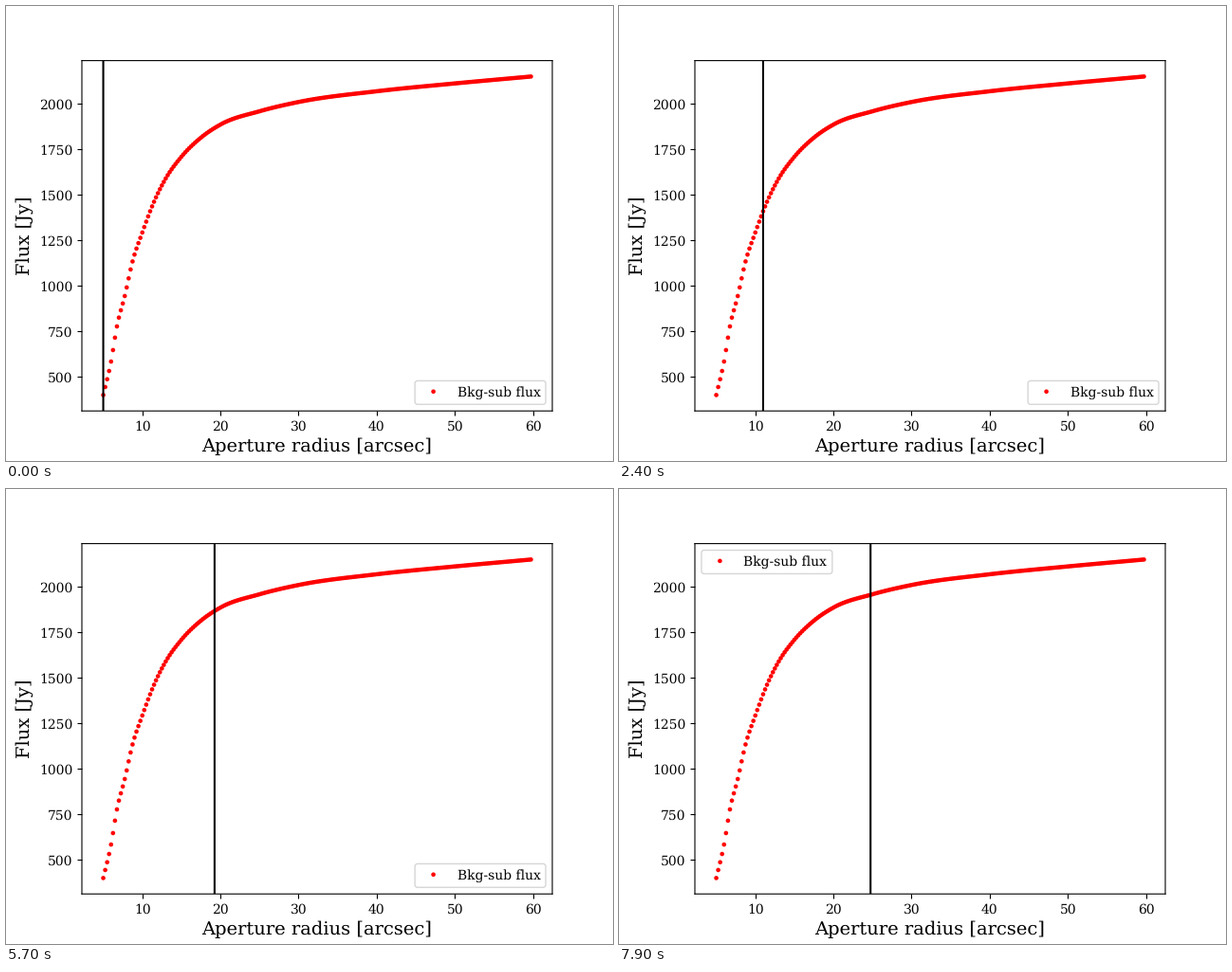
A matplotlib script that plays this animation: 640x480 px, repeating every 8000 ms.

```python
import numpy as np
import matplotlib.pyplot as plt
from matplotlib.animation import FuncAnimation

FRAMES = 80
INTERVAL = 100  # ms
STEP = 0.25     # arcsec between apertures

plt.rcParams.update({
    "font.family": "DejaVu Serif",
    "text.hinting": "none",
    "path.snap": False,
    "legend.scatteryoffsets" if False else "legend.scatterpoints": 1,
})

# Key points of the curve of growth: radius, flux
CURVE = np.array([(5, 400), (6, 584), (6.75, 777), (7.75, 944), (8.75, 1134),
                  (10, 1293), (11.5, 1462), (13, 1590), (15, 1709),
                  (17.5, 1814), (20, 1886), (25, 1959), (30, 2010),
                  (40, 2069), (50, 2112), (59.75, 2150)])


def smooth(x, xs, ys):
    """Cubic Hermite curve through the points (xs, ys)."""
    slope = np.gradient(ys, xs)
    k = np.clip(np.searchsorted(xs, x, side="right") - 1, 0, len(xs) - 2)
    h = xs[k + 1] - xs[k]
    t = (x - xs[k]) / h
    u = 1 - t
    return (ys[k] * (1 + 2 * t) * u**2 + ys[k + 1] * (1 + 2 * u) * t**2
            + h * t * u * (slope[k] * u - slope[k + 1] * t))


radius = np.arange(5, 60, STEP)
flux = smooth(radius, *CURVE.T)

fig, ax = plt.subplots(figsize=(6.4, 4.8), dpi=100)
# One colour per dot keeps the dots from being rounded to whole pixels
ax.scatter(radius, flux, s=11, color=["red"] * radius.size, linewidth=0,
           label="Bkg-sub flux")
marker = ax.axvline(radius[0], color="black")
ax.set_xlabel("Aperture radius [arcsec]", fontsize=14)
ax.set_ylabel("Flux [Jy]", fontsize=14)
# "best" lets the legend jump once the line has cleared the upper left corner
ax.legend(loc="best", scatteryoffsets=[0.5])


def update(i):
    marker.set_xdata([radius[i]] * 2)
    return [marker]


anim = FuncAnimation(fig, update, frames=FRAMES, interval=INTERVAL,
                     repeat=True, repeat_delay=0, blit=False)
plt.show()
```
